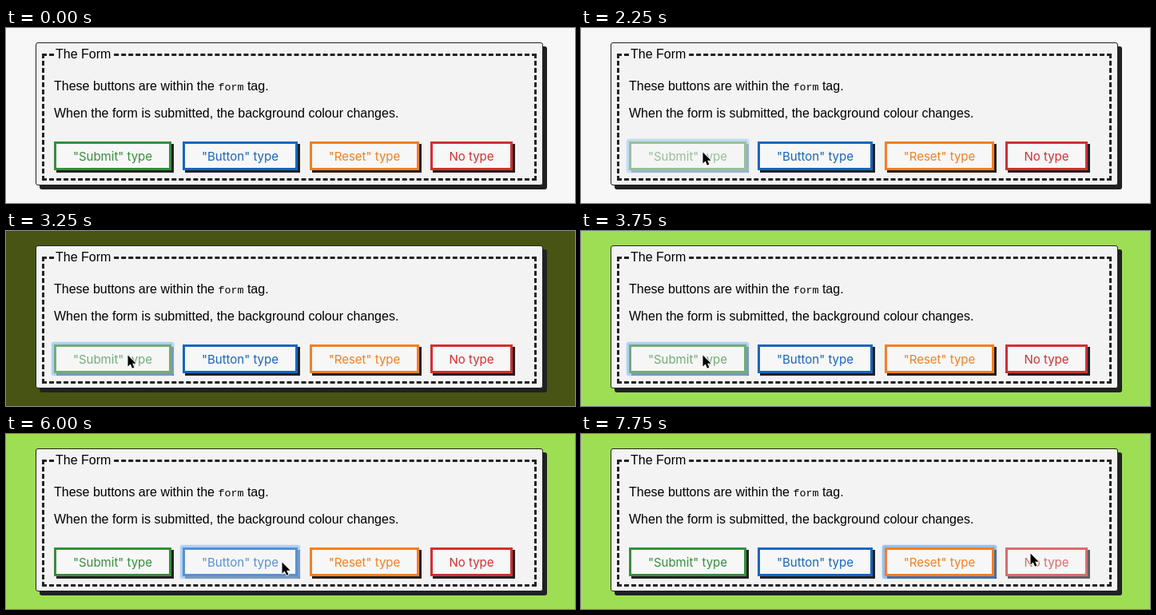
Animation of 712x219 px, one loop 8 s. Source, as an HTML page:

```html
<!DOCTYPE html>
<html lang="en">
<head>
<meta charset="utf-8">
<title>Button types in a form</title>
<style>
  html, body { margin: 0; width: 100%; height: 100%; overflow: hidden; }
  #stage {
    position: relative; width: 712px; height: 219px; overflow: hidden;
    background: #f7f7f7; color: #000;
    font: 16px/17px "Liberation Sans", Arial, sans-serif;
  }
  #stage * { box-sizing: border-box; }
  .card, .frame, .legend, p, .btn, .ring, #cursor { position: absolute; margin: 0; white-space: nowrap; }
  .card {
    left: 37px; top: 18px; width: 635px; height: 179px;
    background: #f3f3f3; border: 1px solid #212121; border-radius: 3px;
    box-shadow: 5px 5px 0 #212121;
  }
  .frame { left: 45px; top: 32px; width: 619px; height: 159px; border: 3px dashed #212121; }
  .legend { left: 60px; top: 24px; width: 73px; padding-left: 2px; background: #f3f3f3; }
  p { left: 60px; }
  code { font: 13.333px "Liberation Mono", "Courier New", monospace; line-height: 15px; }
  .btn {
    top: 142px; height: 36px; padding-top: 6px; text-align: center;
    font: 15px/19px Inter, Roboto, sans-serif;
    color: var(--c); background: #f7f7f7; border: 3px solid var(--c);
    box-shadow: 3px 3px 0 #212121;
  }
  .ring {
    inset: -6px; border: 3px solid rgba(88, 164, 252, .62); border-radius: 3px;
    box-shadow: 0 0 2px rgba(88, 164, 252, .5); opacity: 0;
  }
  #cursor { left: 0; top: 0; overflow: visible; }
</style>
</head>
<body>
<div id="stage">
  <div class="card"></div>
  <div class="frame"></div>
  <div class="legend">The Form</div>
  <p style="top:64px">These buttons are within the <code>form</code> tag.</p>
  <p style="top:98px">When the form is submitted, the background colour changes.</p>
  <div class="btn" id="submit" style="left:60px;width:147px;--c:#388e3c">"Submit" type<i class="ring"></i></div>
  <div class="btn" id="button" style="left:221px;width:144px;--c:#1765c0">"Button" type<i class="ring"></i></div>
  <div class="btn" id="reset" style="left:380px;width:137px;--c:#f57f20">"Reset" type<i class="ring"></i></div>
  <div class="btn" id="plain" style="left:531px;width:103px;--c:#d32f2f">No type</div>
  <svg id="cursor" width="12" height="18">
    <path d="M.5 .5V14.6L3.7 11.6L6 16.8L8.4 15.8L6.2 10.7H10.6Z"
      fill="#000" stroke="#fff" stroke-width="1.6" stroke-linejoin="round" paint-order="stroke"/>
  </svg>
</div>
<script>
  const LOOP = 8000, HOVER = 0.7, PRESS = 0.5;
  const $ = id => document.getElementById(id);

  // Each step is [time, value]; a value holds until the next step.
  function track(el, prop, steps) {
    const frames = steps.map(([t, v]) => ({ offset: t / LOOP, [prop]: v, easing: 'steps(1, end)' }));
    frames.push({ offset: 1, [prop]: steps[steps.length - 1][1] });
    el.animate(frames, { duration: LOOP, iterations: Infinity });
  }

  const ring = (id, from, to = LOOP) => track($(id).querySelector('.ring'), 'opacity',
    [[0, 0], [from, 1], ...(to < LOOP ? [[to, 0]] : [])]);

  track($('stage'), 'backgroundColor', [
    [0, '#f7f7f7'], [2500, '#e639a0'], [3250, '#475413'], [3750, '#9ede54']
  ]);

  track($('submit'), 'opacity', [
    [0, 1], [2250, PRESS], [2500, HOVER], [3000, PRESS], [3250, HOVER],
    [3500, PRESS], [3750, HOVER], [4250, 1]
  ]);
  track($('button'), 'opacity', [[0, 1], [4250, HOVER], [6250, 1]]);
  track($('reset'), 'opacity', [[0, 1], [6250, HOVER], [7750, 1]]);
  track($('plain'), 'opacity', [[0, 1], [7750, HOVER]]);

  ring('submit', 2250, 4750);
  ring('button', 4750, 6750);
  ring('reset', 6750);

  track($('cursor'), 'transform', [
    [0, -40, 0], [500, 161, 0], [750, 152, 118], [1000, 152, 143], [1250, 152, 155],
    [4000, 156, 158], [4250, 223, 160], [4500, 238, 159], [4750, 238, 158],
    [5750, 249, 159], [6000, 345, 160], [6250, 391, 160], [6500, 406, 160],
    [6750, 407, 158], [7500, 430, 157], [7750, 562, 149]
  ].map(([t, x, y]) => [t, `translate(${x}px, ${y}px)`]));
</script>
</body>
</html>
```
